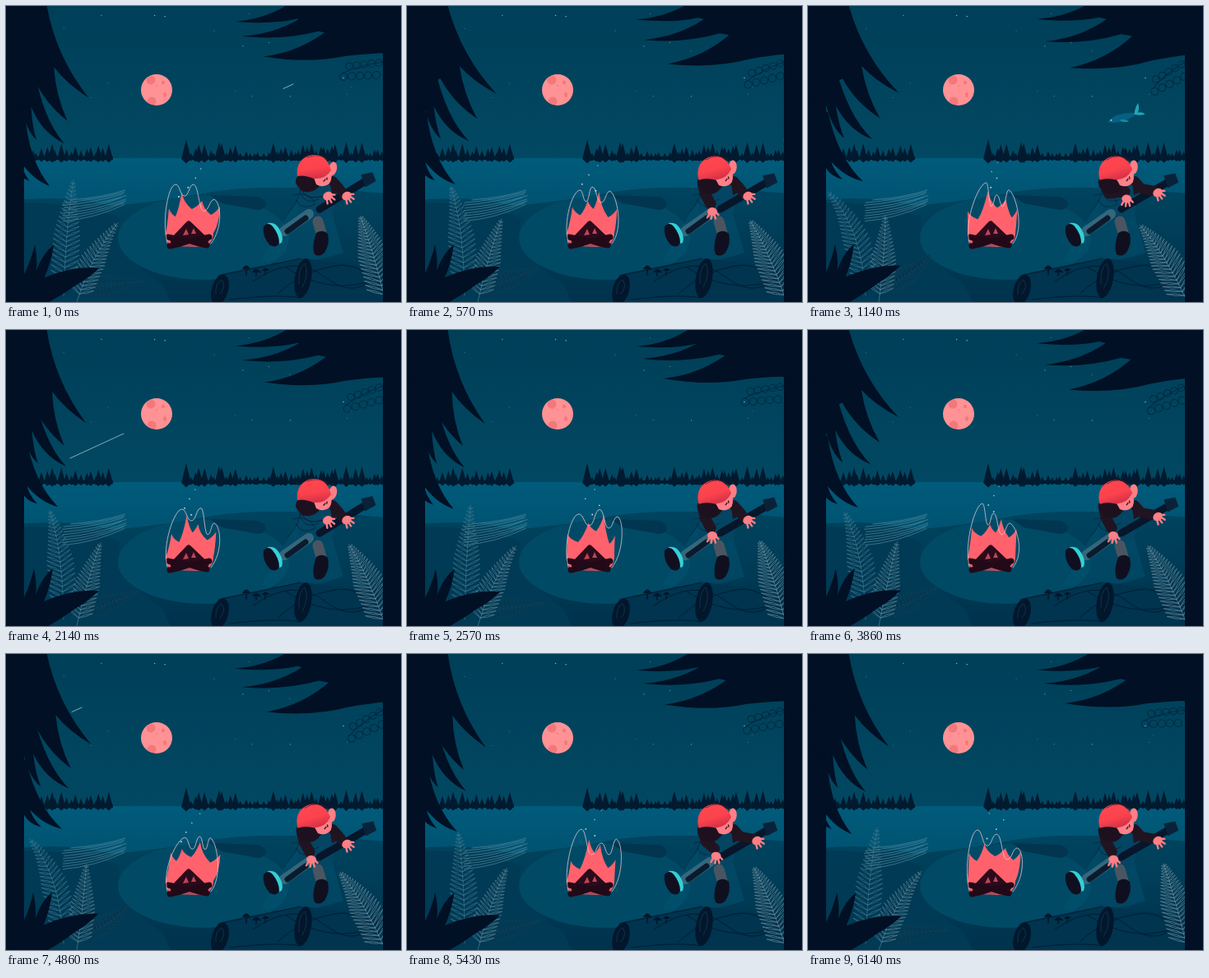
An HTML page that plays this animation: 480x360 px, repeating every 6280 ms.

```html
<!DOCTYPE html>
<html lang="en">
<head>
<meta charset="utf-8">
<title>Campfire night</title>
<style>
html, body { margin: 0; width: 100%; height: 100%; overflow: hidden; background: #00435c; }
svg { display: block; width: 100vw; height: 100vh; }
.dark { fill: #011024; }
.line { fill: none; stroke-linecap: round; stroke-linejoin: round; }
</style>
</head>
<body>
<svg viewBox="0 0 480 360" preserveAspectRatio="none">
  <defs>
    <linearGradient id="night" x2="0" y2="1"><stop stop-color="#003f58"/><stop offset="1" stop-color="#024862"/></linearGradient>
    <linearGradient id="lake" x2="0" y2="1"><stop stop-color="#015b7b"/><stop offset="1" stop-color="#00506e"/></linearGradient>
    <linearGradient id="soil" x2="0" y2="1"><stop stop-color="#00445f"/><stop offset="1" stop-color="#00324c"/></linearGradient>
    <linearGradient id="wool" x2=".2" y2="1"><stop stop-color="#ff4850"/><stop offset=".65" stop-color="#fb424d"/><stop offset="1" stop-color="#d93348"/></linearGradient>
    <clipPath id="air"><path d="M0 0H480V185H0Z"/></clipPath>
    <clipPath id="disc"><circle cx="183" cy="102" r="18.5"/></clipPath>
  </defs>

  <path d="M0 0H480V190H0Z" fill="url(#night)"/>
  <g id="stars" fill="#7fb4c0"></g>
  <path id="meteor" class="line" stroke="#8fbcc8" stroke-width=".9"/>
  <circle cx="183" cy="102" r="19" fill="#ff9294"/>
  <g clip-path="url(#disc)" fill="#f4777b">
    <circle cx="176" cy="90" r="5.5"/><circle cx="177" cy="116" r="5.5"/><circle cx="191" cy="93" r="2.2"/>
    <ellipse cx="193" cy="108" rx="2" ry="3"/><circle cx="183" cy="97" r="1"/>
  </g>
  <g clip-path="url(#air)"><g id="fish">
    <path d="M-21 2Q-8 -7 12 -1L18 0L12 3Q-8 9 -21 2Z" fill="#075f83"/>
    <path d="M13 1Q16 -7 21 -11Q21 -4 18 0Q23 0 26 4Q19 5 13 1Z" fill="#20a6b5"/>
    <path d="M-6 3Q2 4 5 8Q-4 8 -6 3Z" fill="#128ba4"/><circle cx="-16" cy="1" r="1" fill="#9fd8dc"/>
  </g></g>

  <path d="M0 185H480V260H0Z" fill="url(#lake)"/>
  <path id="woods" fill="#021a2f"/>

  <path d="M0 238Q70 228 130 243Q210 235 250 226Q330 214 480 230V360H0Z" fill="url(#soil)"/>
  <path d="M0 240Q90 236 138 258Q130 300 190 338L200 360H0Z" fill="#003a55"/>
  <ellipse cx="240" cy="282" rx="104" ry="51" fill="#014a66"/>
  <path d="M248 230L306 232Q318 236 315 244Q310 250 300 247L262 240Z" fill="#02354f"/>
  <path d="M310 310L352 238H392L410 300Q360 318 310 310Z" fill="#035270" opacity=".5"/>

  <path d="M258 327Q310 315 362 307L480 322V360H250Z" fill="#00344f"/>
  <g class="line" stroke="#021d33" stroke-width="1">
    <path d="M262 327Q310 318 358 307M272 357Q330 350 358 355M300 335Q350 300 388 330T455 322M330 350Q360 322 400 316Q420 312 438 326M340 318Q390 350 438 336"/>
    <path d="M292 327V319M304 328V322M315 327V321" stroke-width="2"/>
  </g>
  <path d="M287 320Q292 311 297 320ZM299 324Q304 316 310 324ZM311 322Q315 315 320 322Z" fill="#02172b"/>
  <g fill="#02172c">
    <ellipse cx="260" cy="345" rx="10" ry="19" transform="rotate(15 260 345)"/>
    <ellipse cx="361" cy="331" rx="10" ry="24" transform="rotate(10 361 331)"/>
  </g>
  <path d="M255 350Q254 337 262 333Q268 341 260 350M356 338Q355 318 363 313Q369 326 360 342" class="line" stroke="#14405a" stroke-width=".7"/>

  <path id="flame" fill="#ff626c"/>
  <g class="line" stroke="#2a0b1c" stroke-width="7">
    <path d="M203 285L222 265L243 285Z" fill="#2a0b1c"/>
    <path d="M197 281L244 291M199 292L247 281" stroke="#220918"/>
  </g>
  <path d="M215 279L219 271L222 278ZM225 277L228 270L231 277ZM214 292L223 289L232 292Z" fill="#c04452"/>
  <path id="halo" class="line" stroke="#e8ccd6" stroke-width=".9" opacity=".85"/>
  <g id="sparks" fill="#b9d9df"></g>

  <path d="M353 214Q356 203 378 208Q399 208 403 224L396 256Q374 265 355 251Z" fill="#034562"/>
  <path d="M338 274L368 253" class="line" stroke="#35677c" stroke-width="12"/>
  <path d="M342 274L364 258" class="line" stroke="#0b1b2d" stroke-width="7"/>
  <path d="M379 262L383 276" class="line" stroke="#4b5561" stroke-width="13"/>
  <path d="M318 264Q327 262 332 271Q338 281 335 288L325 291Z" fill="#35d0d6"/>
  <path d="M313 268Q319 262 324 268Q332 278 332 288Q329 295 321 291Q311 281 313 268Z" fill="#100f20"/>
  <path d="M377 276Q385 271 391 277Q394 289 387 300Q381 306 375 302Q371 293 377 276Z" fill="#100f20"/>
  <path d="M343 251Q356 238 357 224Q362 243 380 235M348 230Q368 224 376 241Q360 250 352 236" class="line" stroke="#02283f" stroke-width=".8"/>
  <path d="M393 207Q407 211 408 224L396 230Z" fill="#211421"/>
  <g id="guitar">
    <path d="M381 247L437 214" class="line" stroke="#07162a" stroke-width="9"/>
    <path d="M432 206L446 203L450 214L437 221Z" fill="#0a2239"/>
  </g>
  <path id="farArm" class="line" stroke="#211421" stroke-width="12"/>
  <g id="farHand"></g>
  <path id="nearArm" class="line" stroke="#211421"/>
  <g id="nearHand"></g>
  <g id="head">
    <path d="M352 215Q352 203 367 202L386 205L380 220Q370 230 358 224Z" fill="#1d111f"/>
    <ellipse cx="397" cy="198" rx="5" ry="8.5" fill="#ff7f86" transform="rotate(12 397 198)"/>
    <path d="M373 206L394 197Q398 208 393 216Q386 222 377 217Z" fill="#ff8088"/>
    <path d="M386 213L388 211M390 211V209" class="line" stroke="#3a1020" stroke-width="1.4"/>
    <path d="M354 207C352 188 365 180 377 181Q391 183 395 200Q388 211 374 210Q363 205 354 207Z" fill="url(#wool)"/>
    <path d="M366 184Q384 177 394 190" class="line" stroke="#5e1630" stroke-width=".7"/>
  </g>

  <g id="berries" class="line" stroke="#022a42" stroke-width="1"></g>
  <path id="reeds" class="line" stroke="#5b8fa1" stroke-width=".8" opacity=".8"/>
  <g id="ferns" class="line"></g>

  <g class="dark">
    <path d="M0 0H22V360H0Z"/>
    <path d="M458 40H480V360H458Z"/>
    <path id="leftTop" d="M0 -30H45Q53 50 103 110Q76 94 60 74Q63 108 78 139Q50 118 36 88L0 100Z"/>
    <path id="leftMid" d="M0 60L34 75Q46 135 74 165Q46 153 32 122Q34 145 40 162Q26 150 20 120L0 130Z"/>
    <path id="leftLow" d="M0 110L24 130Q32 185 61 216Q40 210 24 190Q26 200 36 212Q22 208 16 195L0 190Z"/>
    <path id="rightTop" d="M500 -20H365Q330 14 278 18Q325 22 354 15L500 50Z"/>
    <path id="rightMid" d="M500 -5L370 8Q335 35 287 39Q335 44 380 32L500 56Z"/>
    <path id="rightLow" d="M500 5L395 30Q360 60 315 67Q370 74 415 63Q442 59 459 58L500 68Z"/>
    <path id="bush" d="M10 362L22 325Q30 308 34 290Q38 310 36 322Q44 300 57 290Q54 312 46 330Q80 315 113 317Q100 330 84 339Q68 351 48 362Z"/>
  </g>
</svg>
<script>
const LOOP = 6280, STEPS = 44, TAU = Math.PI * 2;
const $ = id => document.getElementById(id);
const set = (id, name, value) => $(id).setAttribute(name, value);
const turn = (id, deg, x, y) => set(id, 'transform', `rotate(${deg} ${x} ${y})`);
const mix = (a, b, u) => a + (b - a) * u;
const dot = (x, y, r) => `<circle cx="${x}" cy="${y}" r="${r}"/>`;
const range = n => [...Array(n).keys()];
const wave = (k, period, lag) => Math.sin(TAU * (k - lag) / period);
const ease = (a, b, v) => {
  const u = Math.min(1, Math.max(0, (v - a) / (b - a)));
  return u * u * (3 - 2 * u);
};
function random(seed) {
  return () => (seed = seed * 16807 % 2147483647) / 2147483647;
}

// Four leaning tongues and a loose line that licks above them.
function flame(k) {
  const tips = range(4).map(j => [
    198 + 19.5 * j + 4 * wave(k, 11, j * 3),
    257 - 28 * Math.sin(Math.PI * (j + .5) / 4) + 6 * wave(k, 22 / 3, j * 2.6)]);
  let d = 'M203 292Q193 288 194 276';
  let [px, py] = [194, 276];
  tips.forEach(([x, y], j) => {
    if (j) {
      const vx = mix(px, x, .5), vy = Math.max(py, y) + 10;
      d += `Q${px + 2} ${mix(py, vy, .6)} ${vx} ${vy}`;
      [px, py] = [vx, vy];
    }
    d += `Q${mix(px, x, .55)} ${mix(py, y, .3)} ${x} ${y}`;
    [px, py] = [x, y];
  });
  set('flame', 'd', d + `Q${px - 1} 265 252 276Q252 288 241 293Z`);

  const crests = range(3).map(j => [
    212 + 19 * j + 6 * wave(k, 22, j * 4 + 5),
    217 + 6 * j + 7 * wave(k, 44 / 3, j * 5)]);
  let [x0, y0] = crests[0];
  d = `M196 288C189 262 ${x0 - 9} ${y0} ${x0} ${y0}`;
  const bend = (x, y) => {
    const m = mix(x0, x, .5);
    d += `C${m} ${y0} ${m} ${y} ${x} ${y}`;
    [x0, y0] = [x, y];
  };
  for (const [x, y] of crests.slice(1)) {
    bend(mix(x0, x, .5), Math.max(y0, y) + 14);
    bend(x, y);
  }
  set('halo', 'd', d + `C${x0 + 8} ${y0 + 4} 264 270 249 289`);

  $('sparks').innerHTML = range(4).map(j => {
    const u = (k / 11 + j * .27) % 1;
    return dot(210 + j * 5 + 14 * u + 3 * Math.sin(k + j), 232 - 42 * u, 1.1 - .5 * u);
  }).join('');
}

// A stem bent as a quadratic curve, with paired leaflets tapering to the tip.
function frond([bx, by], [cx, cy], [tx, ty], size, count, color, fill = 'none') {
  let d = `M${bx} ${by}Q${cx} ${cy} ${tx} ${ty}`;
  for (let i = 2; i < count; i++) {
    const u = i / count, v = 1 - u;
    const x = v * v * bx + 2 * u * v * cx + u * u * tx;
    const y = v * v * by + 2 * u * v * cy + u * u * ty;
    const a = Math.atan2(v * (cy - by) + u * (ty - cy), v * (cx - bx) + u * (tx - cx));
    const len = size * Math.min(1, v * 1.5 + .1);
    for (const side of [-1, 1]) {
      const b = a + side * 1.05, ex = x + len * Math.cos(b), ey = y + len * Math.sin(b);
      const mx = (x + ex) / 2, my = (y + ey) / 2;
      const nx = -2.2 * Math.sin(b), ny = 2.2 * Math.cos(b);
      d += `M${x} ${y}Q${mx + nx} ${my + ny} ${ex} ${ey}Q${mx - nx} ${my - ny} ${x} ${y}`;
    }
  }
  return `<path d="${d}" stroke="${color}" stroke-width=".7" fill="${fill}"/>`;
}

function plants(k) {
  const c = wave(k, 22, 15);
  $('ferns').innerHTML =
    frond([88, 344], [125, 334 + 5 * c], [160 + 11 * c, 318 + 18 * c], 14, 16, '#12425a', '#02304a') +
    frond([70, 352], [69 + 4 * c, 268], [53 + 32 * c, 219 - 8 * c], 19, 24, '#3d758a') +
    frond([86, 360], [98 + 5 * c, 305], [115 + 23 * c, 259 + 5 * c], 18, 22, '#557f90') +
    frond([462, 362], [440 + 6 * c, 298 - 4 * c], [417 + 15 * c, 261 - 6 * c], 22, 24, '#668797');
  turn('berries', -12 + 13 * c, 458, 68);
  turn('bush', c, 22, 358);
  turn('leftTop', -4.2 * wave(k, 22, 1.2), 45, 0);
  turn('leftMid', -3 * wave(k, 22, 3), 18, 85);
  turn('leftLow', -4.7 * wave(k, 22, 5), 20, 120);
  turn('rightTop', .6 * wave(k, 22, 1.5), 480, -10);
  turn('rightMid', -1.2 * wave(k, 22, 2), 485, 0);
  turn('rightLow', -2.8 * wave(k, 22, 2.5), 485, 0);
}

function hand(id, x, y, deg) {
  $(id).innerHTML = `<g transform="translate(${x} ${y}) rotate(${deg})" fill="#ff7f86">` +
    '<ellipse rx="6" ry="5"/><path class="line" stroke="#ff7f86" stroke-width="2.4" d="M-3 3L-5 8M0 4V9M3 3L5 8M4 0L8 3"/></g>';
}

// Six strums a loop; the far hand swaps chords on every strum.
function player(k) {
  const beats = k * 6 / STEPS, beat = beats % 1;
  const lifted = beat < .07;
  const down = ease(.03, .25, beat) - ease(.85, 1.05, beat);
  const hx = mix(391, 371, down), hy = mix(231, 250, down);
  const odd = Math.floor(beats) % 2;
  const fx = odd ? 425 : 414, fy = odd ? 227 : 231;
  set('farArm', 'd', `M397 213L405 222L${fx - 4} ${fy - 2}`);
  set('nearArm', 'd', lifted ? `M360 220Q360 238 ${hx - 5} ${hy}` : `M359 214L${mix(359, hx, .25)} 228L${hx - 2} ${hy - 9}`);
  set('nearArm', 'stroke-width', lifted ? .9 : 13);
  hand('farHand', fx, fy, -35);
  hand('nearHand', hx, hy, lifted ? -30 : 8);
  turn('head', lifted ? 0 : -9, 384, 205);
  turn('guitar', lifted ? -1 : .5, 390, 240);
}

function sky(k) {
  let d = '';
  for (const [at, x, y] of [[0, 349, 95], [14, 165, 116], [34, 92, 65]]) {
    const n = k - at;
    if (n >= 0 && n < 3) {
      const len = 12 + 53 * (n % 2);
      d = `M${x - 22 * n} ${y + 10 * n}l${-len} ${len * .46}`;
    }
  }
  set('meteor', 'd', d);
  const u = k - 7.3;
  set('fish', 'visibility', Math.abs(u) < 4.6 ? 'visible' : 'hidden');
  set('fish', 'transform', `translate(${399 - 22 * u} ${132 + 4 * u * u}) rotate(${-Math.atan2(8 * u, 22) * 57.3})`);
}

function scenery() {
  const rnd = random(77);
  $('stars').innerHTML = range(18).map(() => dot(70 + 350 * rnd(), 8 + 150 * rnd(), .4 + .4 * rnd())).join('');

  let d = 'M22 183H130V187H22ZM215 183H460V187H215Z';
  const grow = (from, to, tall) => {
    for (let x = from; x < to; x += 3 + 5 * rnd()) {
      const h = 6 + tall * rnd() ** 1.6, w = 2.5 + h * .15;
      d += `M${x - w} 186L${x} ${185 - h}L${x + w} 186L${x} ${187 + h * .2}Z`;
    }
  };
  grow(26, 128, 12);
  grow(219, 300, 18);
  grow(302, 457, 14);
  set('woods', 'd', d);

  set('reeds', 'd', range(9).map(i => {
    const x = 66 + 14 * rnd(), y = 236 + 3.2 * i;
    return `M${x} ${y}Q${x + 38} ${y - 3} ${138 + 8 * rnd()} ${224 + 2.2 * i}`;
  }).join(''));

  $('berries').innerHTML = '<path d="M458 68Q430 72 408 82"/>' +
    range(5).map(i => dot(410 + i * 10, 86 - i * .5, 4.5) + dot(417 + i * 9, 73 - i, 4.2)).join('');
}

function draw(ms) {
  const k = Math.floor(((ms % LOOP) + 4) * STEPS / LOOP) % STEPS;
  sky(k);
  flame(k);
  player(k);
  plants(k);
}

scenery();
const start = performance.now();
function tick() {
  draw(performance.now() - start);
  requestAnimationFrame(tick);
}
tick();
</script>
</body>
</html>
```
